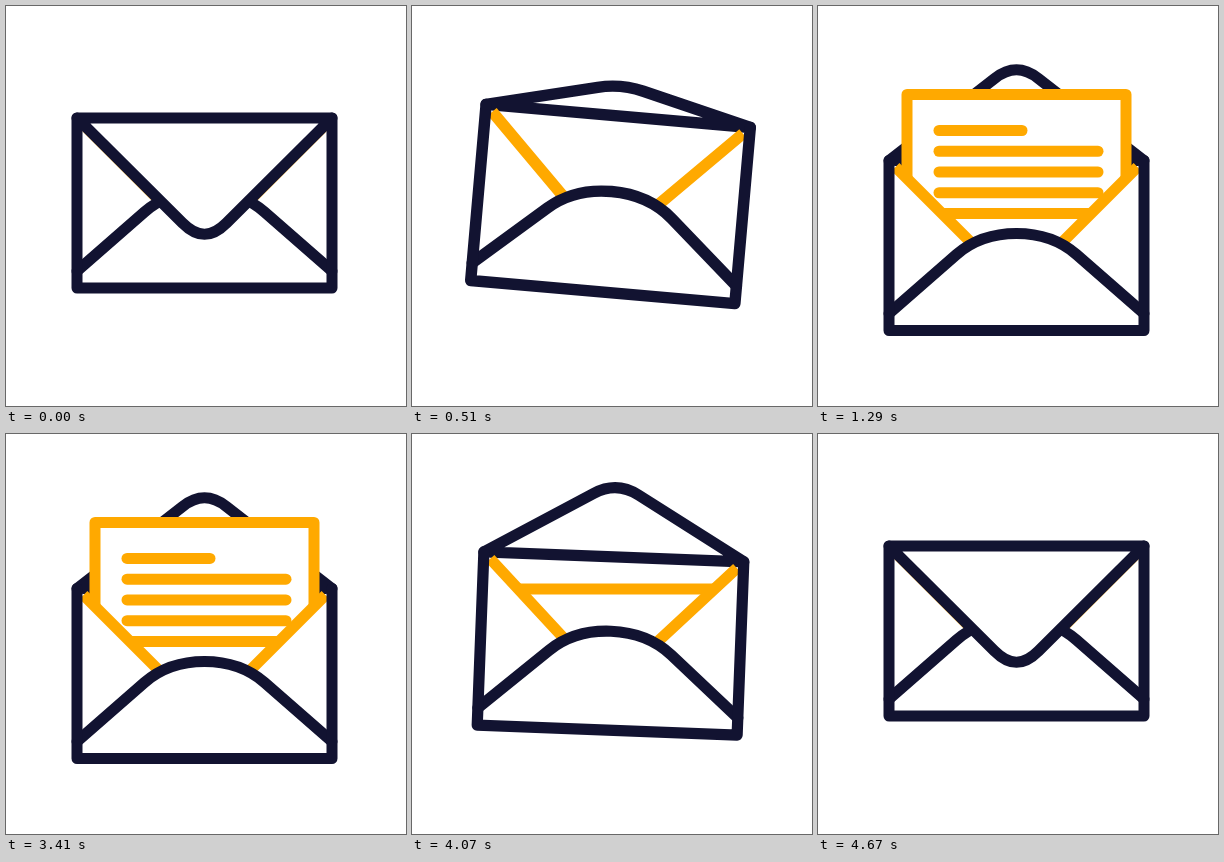
Animation of 400 by 400 pixels, one loop 5.7 s. Source, as an HTML page with a canvas:

```html
<!DOCTYPE html>
<html lang="en">
<head>
<meta charset="utf-8">
<title>Envelope</title>
<style>
  html, body { margin: 0; width: 100%; height: 100%; overflow: hidden; background: #fff; }
  canvas { display: block; }
</style>
</head>
<body>
<canvas id="stage" width="400" height="400"></canvas>
<script>
const ctx = document.getElementById('stage').getContext('2d');
const INK = '#121331', AMBER = '#ffa900';
const LOOP = 5700, OPEN_TIME = 1290, CLOSED_AT = 4670, STEP = 30;
const CENTER_X = 198.5;

// Keys are [ms, value]; a smooth curve without overshoot runs through them.
function track(...keys) {
  const slope = i => (keys[i + 1][1] - keys[i][1]) / (keys[i + 1][0] - keys[i][0]);
  const tangents = keys.map((_, i) => {
    if (i === 0 || i === keys.length - 1) return 0;
    const a = slope(i - 1), b = slope(i);
    return a * b > 0 ? 2 * a * b / (a + b) : 0;
  });
  return t => {
    if (t <= keys[0][0]) return keys[0][1];
    const i = keys.findIndex(k => k[0] >= t) - 1;
    if (i < 0) return keys[keys.length - 1][1];
    const [t0, v0] = keys[i], [t1, v1] = keys[i + 1];
    const d = t1 - t0, u = (t - t0) / d, w = 1 - u;
    return w * w * (1 + 2 * u) * v0 + u * u * (3 - 2 * u) * v1
      + d * u * w * (w * tangents[i] - u * tangents[i + 1]);
  };
}

const centerY = track([0, 197], [90, 207], [160, 212], [390, 198], [450, 196.5], [510, 198],
  [600, 209.5], [690, 231], [780, 247], [820, 247.5], [1020, 239.5]);
const scale = track([0, 1], [150, .95], [390, 1.04], [450, 1.043], [510, 1.04],
  [600, 1.02], [690, .98], [780, .953], [830, .95], [1020, 1]);
const tilt = track([210, 0], [390, 5], [450, 5.5], [510, 5], [600, 2.2], [690, 0]);
const flapFold = track([270, 1], [330, .95], [390, .69], [510, -.245], [600, -.585], [690, -.69], [780, -.78]);
const letterTop = track([480, 220], [600, 155], [690, 100], [780, 86], [810, 85.7], [1050, 87.8], [1290, 88.5]);
const lineGrowth = track([0, 0], [30, .05], [90, .58], [150, .786], [210, .88], [300, .96], [480, 1]);

function shape(d, stroke, fill) {
  const path = new Path2D(d);
  if (fill) {
    ctx.fillStyle = '#fff';
    ctx.fill(path);
  }
  if (stroke) {
    ctx.strokeStyle = stroke;
    ctx.stroke(path);
  }
}

function inEnvelope(t, draw) {
  ctx.save();
  ctx.translate(CENTER_X, centerY(t));
  ctx.rotate(tilt(t) * Math.PI / 180);
  ctx.scale(scale(t), scale(t));
  draw();
  ctx.restore();
}

function drawFlap(fold) {
  const y = v => -85 + v * fold;
  shape(`M-127.5 -85 L-22 ${y(105)} C-7 ${y(120)} 7 ${y(120)} 22 ${y(105)} L127.5 -85Z`, INK, true);
}

function drawLetter(t) {
  const top = letterTop(t), edge = 88;
  shape(`M89 250 V${top} H308 V250`, AMBER, true);
  for (let i = 0; i < 5; i++) {
    const p = lineGrowth(t - 570 - 60 * i);
    if (p <= 0) continue;
    const y = top + 36 + 20.75 * i, end = i ? 280 : 204;
    shape(`M${edge + (121 - edge) * p} ${y} H${edge + (end - edge) * p}`, AMBER);
  }
}

function drawFront() {
  shape('M-127.5 -85 L-30 12.5 H30 L127.5 -85 V85 H-127.5Z', null, true);
  ctx.lineCap = 'butt';
  shape('M-121 -78.5 L-36 6.5 M121 -78.5 L36 6.5', AMBER);
  ctx.lineCap = 'round';
  const pocket = 'M-127.5 68 L-60 9 C-42 -6.7 -22 -12 0 -12 S42 -6.7 60 9 L127.5 68';
  shape(pocket + ' V85 H-127.5Z', null, true);
  shape(pocket, INK);
  shape('M-127.5 -85 V85 H127.5 V-85', INK);
}

function render(t) {
  const fold = flapFold(t);
  ctx.fillStyle = '#fff';
  ctx.fillRect(0, 0, 400, 400);
  ctx.lineWidth = 11;
  ctx.lineCap = ctx.lineJoin = 'round';
  if (fold < 0) inEnvelope(t, () => drawFlap(fold));
  if (t > 480) drawLetter(t);
  inEnvelope(t, () => {
    drawFront();
    if (fold >= 0) drawFlap(fold);
  });
}

// Closing plays the opening backwards, in the same steps.
function poseTime(t) {
  const steps = t < LOOP / 2 ? Math.floor(t / STEP) : Math.ceil((CLOSED_AT - t) / STEP);
  return Math.max(0, Math.min(OPEN_TIME, steps * STEP));
}

const start = performance.now();
function tick() {
  render(poseTime((performance.now() - start) % LOOP));
  requestAnimationFrame(tick);
}
tick();
</script>
</body>
</html>
```
